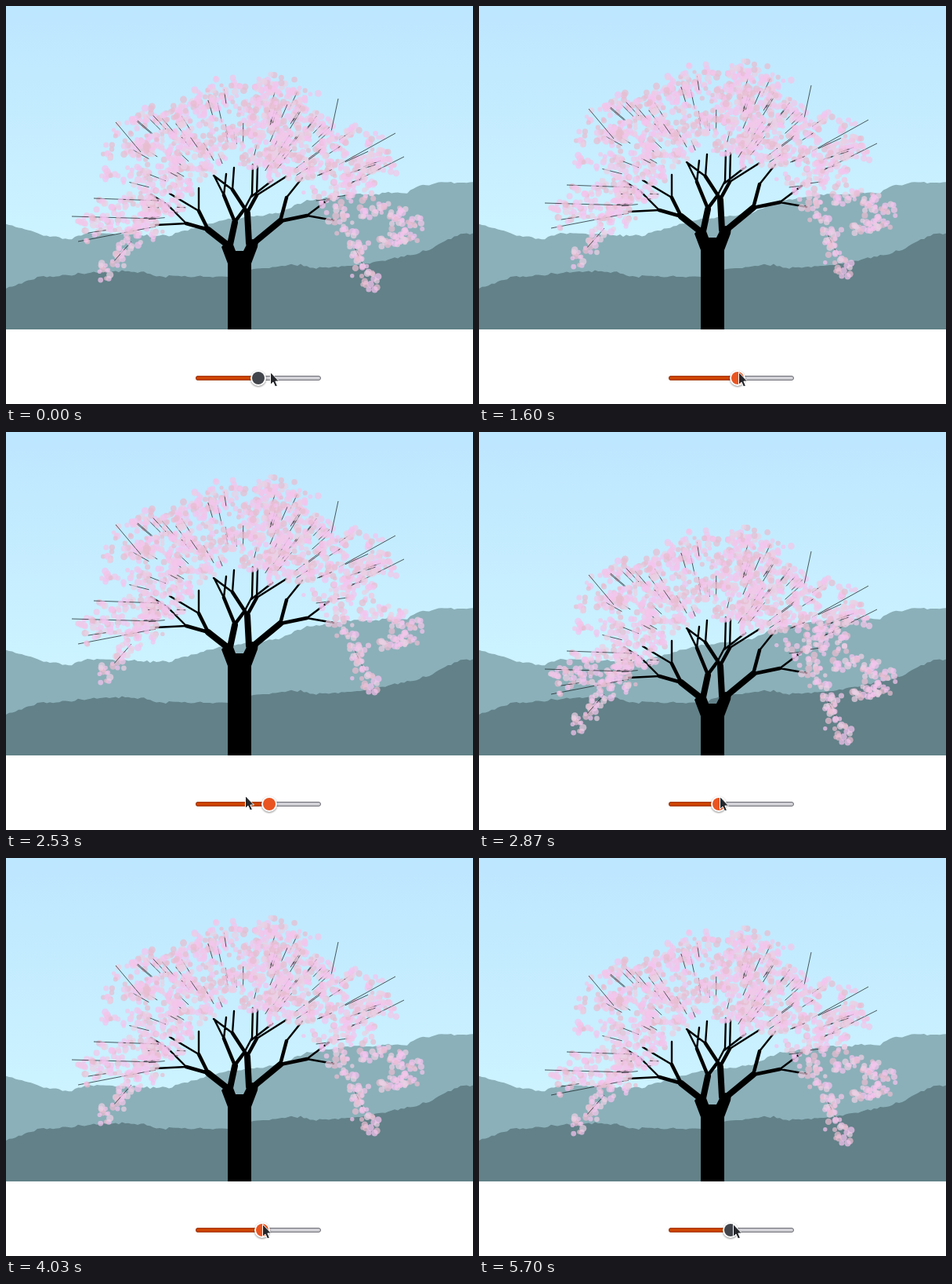
Recreate the animation shown at these times as an HTML page. Size 596x507 px, loop 6.76 s.

```html
<!DOCTYPE html>
<html lang="en">
<head>
<meta charset="utf-8">
<title>Cherry tree</title>
<style>
  html, body { margin: 0; width: 100%; height: 100%; overflow: hidden; background: #fff; }
  svg { display: block; }
</style>
</head>
<body>
<svg width="596" height="507" viewBox="0 0 596 507">
  <defs>
    <linearGradient id="sky" gradientUnits="userSpaceOnUse" x1="0" y1="0" x2="0" y2="300">
      <stop offset="0" stop-color="#bde6ff"/>
      <stop offset="1" stop-color="#ccf3ff"/>
    </linearGradient>
    <clipPath id="scene"><rect width="596" height="412"/></clipPath>
    <filter id="soft" x="-50%" y="-50%" width="200%" height="200%"><feGaussianBlur stdDeviation="1.2"/></filter>
  </defs>
  <g clip-path="url(#scene)">
    <rect width="596" height="412" fill="url(#sky)"/>
    <path id="far" fill="#8bb0b9"/>
    <path id="near" fill="#628188"/>
    <g id="tree">
      <path d="M283 500V328L275 307 282 299 290 304 293 312H303L307 304 314 297 322 299 321 307 313 328V500Z"/>
      <g fill="none" stroke="#000" stroke-linecap="round" stroke-linejoin="round">
        <path stroke-width="8" d="M281 303L258 285M286 304L292 276M310 302L308 264M316 302L350 274"/>
        <path stroke-width="4.5" d="M230 277L258 285 246 261M278 241L292 275 304 259M289 234L308 263 320 241M358 244L350 274 384 267"/>
        <path stroke-width="2.4" d="M191 279L230 277 207 254 185 240M246 232V261L209 239M266 217L278 241 281 214M304 259L314 240 315 202M265 216L289 234 291 206M321 204L320 241 358 217M313 243L340 222M378 219L358 244M418 273L384 267 412 246"/>
      </g>
      <g id="back"/>
      <path id="twigs" fill="none" stroke="#10181a" stroke-width=".7"/>
      <g id="front"/>
    </g>
  </g>
  <rect x="242.5" y="471.5" width="159" height="5" rx="2.5" fill="#d0d0d6" stroke="#6a6a72"/>
  <rect id="fill" x="242.5" y="471.5" height="5" rx="2.5" fill="#cc4400" stroke="#a33600"/>
  <g id="knob">
    <circle cy="475" r="10" opacity=".45" filter="url(#soft)"/>
    <circle cy="474" r="10" fill="#fff"/>
    <circle id="dot" cy="474" r="8"/>
  </g>
  <path id="cursor" d="M.5 .5V16.5L4 13.2 6.6 19 9.4 17.8 6.9 12.1H11.5Z" fill="#25272b" stroke="#fff"/>
</svg>
<script>
(() => {
  const $ = id => document.getElementById(id);
  const lerp = (a, b, k) => a + (b - a) * k;

  function seeded(s) {
    return () => {
      s = (s + 0x6D2B79F5) | 0;
      let t = Math.imul(s ^ (s >>> 15), 1 | s);
      t = (t + Math.imul(t ^ (t >>> 7), 61 | t)) ^ t;
      return ((t ^ (t >>> 14)) >>> 0) / 4294967296;
    };
  }
  const rand = seeded(41);
  const bell = () => rand() + rand() + rand() - 1.5;

  // Piecewise linear curve through "x,y x,y ..."
  function curve(text) {
    const pts = text.split(' ').map(p => p.split(',').map(Number));
    return x => {
      let i = 1;
      while (i < pts.length - 1 && pts[i][0] < x) i++;
      const [a, b] = [pts[i - 1], pts[i]];
      return lerp(a[1], b[1], (x - a[0]) / (b[0] - a[0]));
    };
  }

  function ridge(id, text) {
    const y = curve(text);
    let d = 'M0 412';
    for (let x = 0; x <= 600; x += 4) d += `L${x} ${(y(x) + bell() * 1.6).toFixed(1)}`;
    $(id).setAttribute('d', d + 'V412Z');
  }
  ridge('far', '0,277 50,293 80,297 105,289 160,291 207,293 270,274 350,263 385,248 430,241 512,237 525,230 557,224 600,225');
  ridge('near', '0,360 40,346 130,338 175,339 190,344 283,345 315,335 372,329 395,334 450,330 515,318 545,309 580,289 600,290');

  const layers = { back: '', front: '' };
  const tints = ['#f4c4ee', '#f2c6e9', '#e8bdd0', '#ead0e3'];

  function blossoms(cx, cy, count, spread) {
    while (count--) {
      const x = cx + bell() * spread, y = cy + bell() * spread;
      const layer = rand() < .55 ? 'back' : 'front';
      layers[layer] += `<circle cx="${x.toFixed(1)}" cy="${y.toFixed(1)}" r="${(2.6 + rand() * 2).toFixed(1)}" fill="${tints[rand() * 4 | 0]}" opacity=".72"/>`;
    }
  }

  // Crown: clumps between two outlines, thinner towards the sides
  const crownTop = curve('82,258 118,234 128,182 145,152 222,116 280,93 340,90 395,114 432,146 515,184');
  const crownBottom = curve('82,272 110,304 195,290 240,232 300,198 350,231 430,262 515,212');
  const density = x => Math.min(1, 1.55 - Math.abs(x - 296) / 190);
  let twigs = 'M112 245L195 248M84 268L191 271M92 300L191 281M140 148L172 186M137 326L160 300M497 162L425 202M424 118L415 160M508 192L440 226M458 335L445 308';
  for (let placed = 0; placed < 300;) {
    const x = lerp(86, 512, rand()), hi = crownTop(x), lo = crownBottom(x), v = rand();
    if (rand() > density(x) * (lo - hi) / 135 * (1 - .55 * v ** 4)) continue;
    const y = lerp(hi + 4, lo - 4, v);
    blossoms(x, y, 5, 11);
    if (placed++ % 4 === 0) {
      const k = .1 + rand() * .08;
      twigs += `M${x.toFixed(1)} ${y.toFixed(1)}L${lerp(x, 300, k).toFixed(1)} ${lerp(y, 260, k).toFixed(1)}`;
    }
  }

  // Hanging sprays: straight runs of clumps
  function spray(x1, y1, x2, y2, clumps) {
    for (let i = 0; i < clumps; i++) {
      const k = i / (clumps - 1);
      blossoms(lerp(x1, x2, k), lerp(y1, y2, k), 8, 13);
    }
  }
  spray(163, 295, 122, 339, 5);
  spray(421, 262, 452, 308, 5);
  spray(450, 318, 464, 354, 4);
  spray(455, 258, 500, 262, 4);
  spray(500, 268, 524, 281, 3);
  spray(514, 290, 482, 301, 4);

  $('twigs').setAttribute('d', twigs);
  $('back').innerHTML = layers.back;
  $('front').innerHTML = layers.front;

  // Pointer positions, each kept until the next one
  const LOOP = 6760, GRAB = 1370, RELEASE = 5200, REST = 322;
  const steps = [{ t: 0, x: 337 }];
  function move(x, from, to = from, count = 1) {
    const start = steps[steps.length - 1].x;
    for (let i = 0; i < count; i++) {
      const t = count > 1 ? lerp(from, to, i / (count - 1)) : from;
      steps.push({ t, x: Math.round(lerp(start, x, (i + 1) / count)) });
    }
  }
  move(320, 30, 100, 3);
  move(326, 130);
  move(318, 270, 400, 2);
  move(323, 600, 830, 3);
  move(331, GRAB, 1600, 6);
  move(332, 1670, 1830, 2);
  move(338, 2030, 2300, 8);
  move(336, 2370, 2470, 3);
  move(305, 2530);
  move(306, 2600);
  move(319, 2870, 3470, 11);
  move(326, 3600);
  move(327, 3730);
  move(326, 4030, 4500, 4);
  move(321, 4600);
  move(319, 4800);
  move(317, RELEASE);
  move(324, 5670, 5700, 2);

  const stepAt = t => steps.findLastIndex(s => s.t <= t);

  // While held, the knob trails the pointer by one step
  function sliderAt(t) {
    if (t < GRAB) return REST;
    const i = stepAt(Math.min(t, RELEASE - 1));
    return Math.max(REST * (steps[i].t === GRAB), steps[i - 1].x);
  }

  let last = '';
  function draw(t) {
    const px = steps[stepAt(t)].x;
    const py = 466 - Math.round(Math.max(0, 318 - px) / 5);
    const slider = sliderAt(t);
    const held = t >= GRAB && t < RELEASE;
    const key = [slider, px, held].join();
    if (key === last) return;
    last = key;
    $('tree').setAttribute('transform', `translate(0 ${Math.round((REST - slider) * 2.125)})`);
    $('fill').setAttribute('width', slider - 242);
    $('knob').setAttribute('transform', `translate(${slider} 0)`);
    $('dot').setAttribute('fill', held ? '#e95420' : '#42454c');
    $('cursor').setAttribute('transform', `translate(${px} ${py})`);
  }

  const begin = performance.now();
  function tick() {
    draw((performance.now() - begin) % LOOP);
    requestAnimationFrame(tick);
  }
  tick();
})();
</script>
</body>
</html>
```
